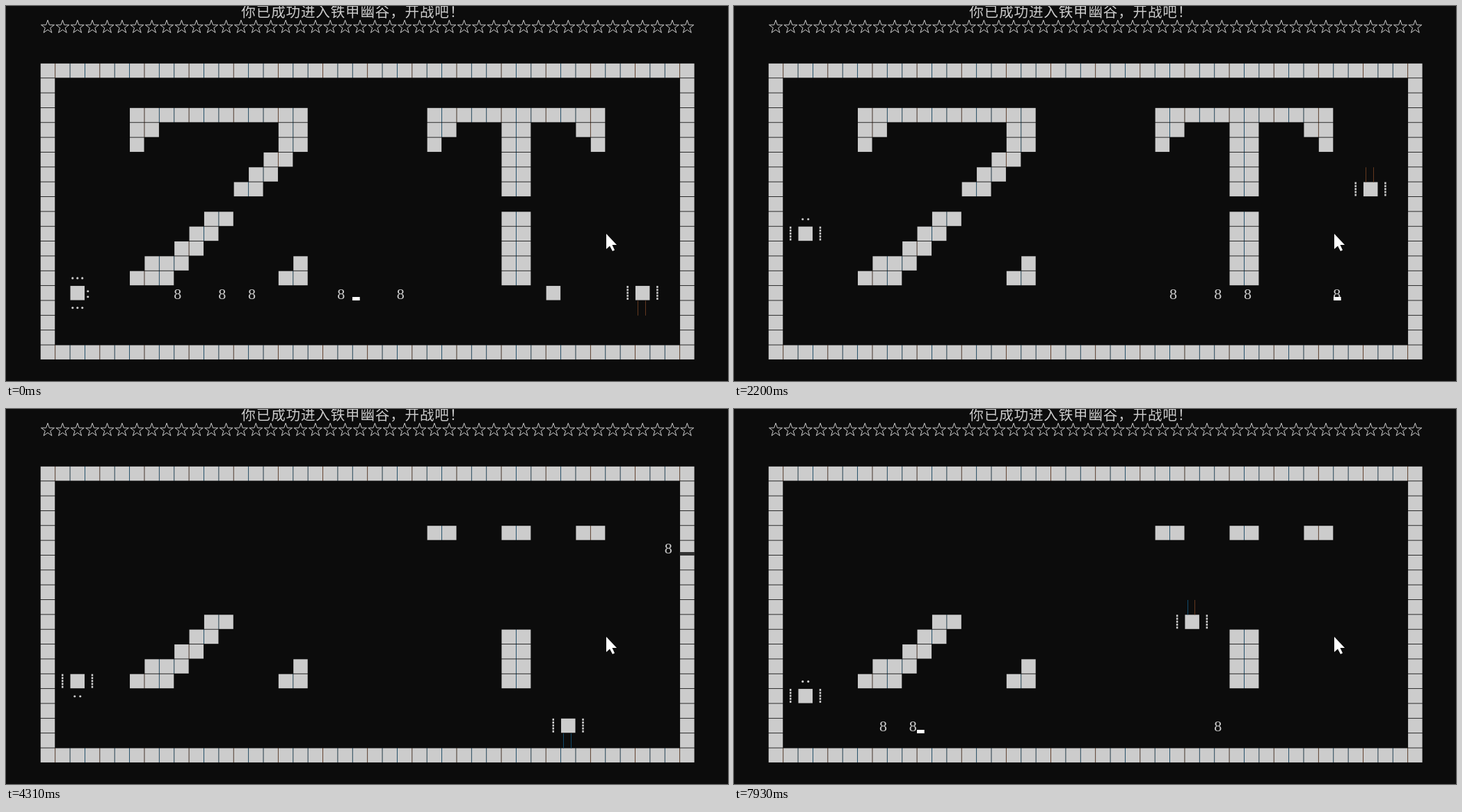
An HTML page with a canvas that plays this animation: 1038 by 540 pixels, repeating every 8 s.

```html
<!DOCTYPE html>
<html lang="zh">
<head>
<meta charset="utf-8">
<title>Console tank battle</title>
<style>
html, body { margin: 0; width: 100%; height: 100%; overflow: hidden; background: #0c0c0c; }
canvas { display: block; }
</style>
</head>
<body>
<canvas id="stage" width="1038" height="540"></canvas>
<script>
const ctx = document.getElementById('stage').getContext('2d');
const LOOP = 8000, COLS = 44, ROWS = 20;
const CELL = 21.38, HALF = CELL / 2, ROW = 21.35, LEFT = 49.3, TOP = 82.8;
const BLOCK = 20.5, GAP = CELL - BLOCK;
const INK = '#cccccc', BACK = '#0c0c0c', BLUE = '#114a6b', BROWN = '#63381f';
const TITLE = '你已成功进入铁甲幽谷，开战吧！';
const BULLET_STEP = 122, SCENE_CUT = 3610;

const halfX = h => LEFT + h * HALF;
const cellX = c => LEFT + c * CELL;
const rowY = r => TOP + r * ROW;

// Wall cells per map row, written as inclusive ranges.
const WALLS = {
  3: '6-17 26-37',
  4: '6-7 16-17 26-27 31-32 36-37',
  5: '6-6 16-17 26-26 31-32 37-37',
  6: '15-16 31-32',
  7: '14-15 31-32',
  8: '13-14 31-32',
  10: '11-12 31-32',
  11: '10-11 31-32',
  12: '9-10 31-32',
  13: '7-9 17-17 31-32',
  14: '6-8 16-17 31-32',
  15: '34-34'
};
const wallCells = Object.entries(WALLS).flatMap(([row, ranges]) =>
  ranges.split(' ').flatMap(range => {
    const [first, last] = range.split('-').map(Number);
    return Array.from({ length: last - first + 1 }, (_, i) => ({ row: +row, col: first + i }));
  }));

function wallStands({ row, col }, t) {
  if (row === 15) return t < 1220;
  if (t < SCENE_CUT) return true;
  return row > 10 || (row === 10 && col < 13) || (row === 4 && col > 25);
}

const DIRS = { up: [0, -1], down: [0, 1], left: [-1, 0], right: [1, 0] };
const walk = (start, period, col, row, dir, count = 1) =>
  Array.from({ length: count }, (_, i) => ({
    time: start + i * period,
    col: col + i * DIRS[dir][0],
    row: row + i * DIRS[dir][1],
    dir
  }));

const player = [
  ...walk(0, 0, 2, 15, 'right'),
  ...walk(375, 375, 2, 15, 'up', 9),
  ...walk(3610, 290, 2, 12, 'down', 3),
  ...walk(4330, 70, 2, 16, 'down', 2),
  ...walk(4430, 0, 2, 17, 'right'),
  ...walk(5930, 470, 2, 17, 'up', 2),
  ...walk(7330, 0, 2, 15, 'up')
];
const enemy = [
  ...walk(0, 0, 40, 15, 'down'),
  ...walk(70, 330, 40, 14, 'up', 11),
  ...walk(3610, 200, 35, 15, 'down', 3),
  ...walk(4330, 0, 35, 17, 'left'),
  ...walk(4430, 150, 34, 17, 'left', 7),
  ...walk(6000, 100, 28, 17, 'up', 2),
  ...walk(6900, 200, 28, 15, 'up', 6)
];
const stateAt = (track, t) => track.filter(s => s.time <= t).pop();

const bullet = (row, h, dir, ref, from, to, limit = 86) => ({ row, h, dir, ref, from, to, limit });
const bullets = [
  ...[18, 24, 28, 40].map(h => bullet(15, h, 1, 0, 0, SCENE_CUT)),
  bullet(15, 48, 1, 0, 0, SCENE_CUT, 68),
  bullet(5, 84, 1, 4310, SCENE_CUT, 4330),
  bullet(17, 24, 1, 5630, 4700, LOOP),
  bullet(17, 51, -1, 5630, 5500, LOOP),
  bullet(17, 55, -1, 5630, 5750, LOOP)
];
const liveBullets = t => bullets
  .filter(b => t >= b.from && t < b.to)
  .map(b => ({ ...b, h: b.h + 2 * b.dir * Math.floor((t - b.ref) / BULLET_STEP) }))
  .filter(b => b.h < b.limit);

// The screen refreshes every 100 ms, restarting at a few shorter steps.
const REFRESH = [0, 3540, 3610, 4330, 4400, 4430];
function refreshTime(t) {
  const start = REFRESH.filter(s => s <= t).pop();
  return start + Math.floor((t - start) / 100) * 100;
}

function rect(x, y, w, h, color = INK) {
  ctx.fillStyle = color;
  ctx.fillRect(x, y, w, h);
}

function dot(x, y) {
  ctx.fillStyle = INK;
  ctx.beginPath();
  ctx.arc(x, y, 1.6, 0, Math.PI * 2);
  ctx.fill();
}

function block(col, row) {
  rect(cellX(col) + GAP / 2, rowY(row), BLOCK, BLOCK);
}

function star(cx, cy) {
  ctx.beginPath();
  for (let i = 0; i < 10; i++) {
    const r = i % 2 ? 3.9 : 10, a = i * Math.PI / 5 - Math.PI / 2;
    ctx.lineTo(cx + r * Math.cos(a), cy + r * Math.sin(a));
  }
  ctx.closePath();
  ctx.strokeStyle = INK;
  ctx.lineWidth = 1;
  ctx.stroke();
}

function drawHeader() {
  ctx.fillStyle = INK;
  ctx.textAlign = 'center';
  ctx.textBaseline = 'alphabetic';
  ctx.font = '300 20.5px "Noto Sans CJK SC", "Noto Sans CJK", sans-serif';
  [...TITLE].forEach((ch, i) => ctx.fillText(ch, halfX(28 + 2 * i), 15.5));
  for (let c = 0; c < COLS; c++) star(cellX(c + .5), 30.3);
}

function drawWalls(t) {
  const cells = wallCells.filter(cell => wallStands(cell, t));
  for (let c = 0; c < COLS; c++) cells.push({ row: 0, col: c }, { row: ROWS - 1, col: c });
  for (let r = 1; r < ROWS - 1; r++) cells.push({ row: r, col: 0 }, { row: r, col: COLS - 1 });
  const taken = new Set(cells.map(({ row, col }) => row * COLS + col));
  for (const { row, col } of cells) {
    const joined = col < COLS - 1 && taken.has(row * COLS + col + 1);
    if (joined) {
      const tint = col % 3 === 0 ? BROWN : BLUE;
      rect(cellX(col + 1) - GAP / 2, rowY(row), GAP, BLOCK, tint);
    }
    block(col, row);
  }
}

function drawTank({ col, row, dir }, isEnemy) {
  const [dx, dy] = DIRS[dir];
  const cx = cellX(col + .5), cy = rowY(row + .5);
  block(col, row);
  if (dy) {
    for (const side of [-1, 1])
      for (let i = 0; i < 5; i++) rect(cx + side * CELL - 1.4, rowY(row) + i * 4.25, 2.5, 3);
    for (const h of [col * 2, col * 2 + 1]) {
      if (isEnemy) {
        const tint = [10, 11].includes(h % 15) ? BLUE : BROWN;
        rect(Math.floor(halfX(h + .5)) - 1, rowY(row + dy), 1, ROW, tint);
      } else {
        dot(cx + (h % 2 ? 4 : -4), cy + dy * ROW);
      }
    }
  } else {
    for (const side of [-1, 1])
      for (const i of [-1, 0, 1]) dot(cx + i * 7, cy + side * ROW - .5);
    if (isEnemy) {
      for (const n of [1, 2])
        for (const y of [-3, 2]) rect(halfX(col * 2 - n) + .7, Math.round(cy + y), 9.4, 1);
    } else {
      for (const y of [-3, 5]) dot(cx + dx * 15, cy + y);
    }
  }
}

function drawBullets(live) {
  ctx.fillStyle = INK;
  ctx.textAlign = 'center';
  ctx.textBaseline = 'alphabetic';
  ctx.font = '22px "Liberation Serif", serif';
  for (const b of live) ctx.fillText('8', halfX(b.h + .5) - .4, rowY(b.row) + 18.5);
}

// The text cursor hops between the bullets being reprinted.
function drawTextCursor(live, t) {
  if (!live.length) return;
  const n = Math.floor(t / 100);
  const b = live[(2 * n + 3) % live.length];
  const ahead = n % 8 === 6 ? 0 : n % 8 === 2 ? -2 : 2;
  const h = b.h + (b.dir < 0 ? 1 : ahead);
  const y = Math.round(rowY(b.row)) + 16;
  if (h >= 86) rect(cellX(COLS - 1), y, CELL, 5, '#333333');
  else rect(Math.round(halfX(h)), y, HALF, 5, '#ffffff');
}

function drawPointer() {
  ctx.fillStyle = '#ffffff';
  ctx.beginPath();
  [[863, 328], [863, 350], [868, 345.5], [872, 353], [875, 351.5], [871.5, 344], [878, 344]]
    .forEach(p => ctx.lineTo(...p));
  ctx.fill();
}

function draw() {
  const t = refreshTime(performance.now() % LOOP);
  const live = liveBullets(t);
  rect(0, 0, 1038, 540, BACK);
  drawHeader();
  drawWalls(t);
  drawTank(stateAt(player, t), false);
  drawTank(stateAt(enemy, t), true);
  drawBullets(live);
  drawTextCursor(live, t);
  drawPointer();
  requestAnimationFrame(draw);
}
draw();
</script>
</body>
</html>
```
